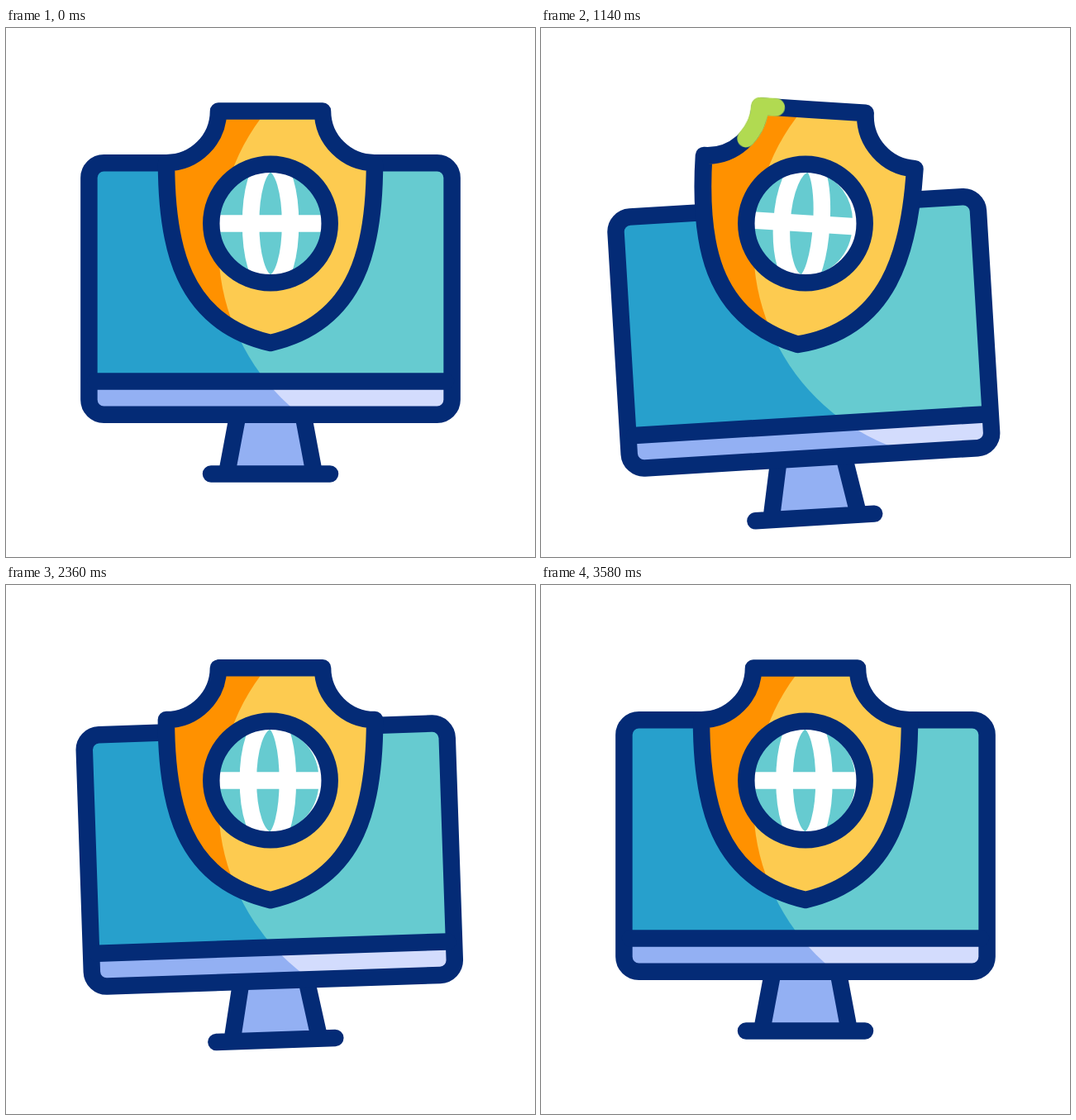
An HTML page without scripts for the animation above (3600 ms loop, 640x640 px).

```html
<!DOCTYPE html>
<html lang="en">
<head>
<meta charset="utf-8">
<title>Secure browsing</title>
<style>
  html, body { margin: 0; width: 100%; height: 100%; overflow: hidden; background: #fff; }
  svg { display: block; width: 100%; height: 100%; }

  .line { fill: none; stroke: #042b76; stroke-width: 20.5; stroke-linecap: round; stroke-linejoin: round; }
  .green { stroke: #b1da51; stroke-width: 21.3; }
  .white { stroke: #fff; stroke-linecap: butt; }

  .monitor, .shield, .globe {
    --ease: cubic-bezier(.333, 0, .667, 1);
    transform-origin: 320px 236.5px;
  }
  .monitor { transform-origin: 320px 351.5px; animation: lift 3.6s var(--ease) infinite, sway 3.6s var(--ease) infinite; }
  .shield { animation: rock 3.6s var(--ease) infinite, pulse 3.6s var(--ease) infinite; }
  .globe { animation: rock 3.6s var(--ease) infinite; }

  @keyframes lift {
    0%, 75%, 100% { translate: 0 0; }
    29.2%, 43.1% { translate: 0 52.8px; }
  }
  @keyframes sway {
    0%, 4.2%, 75.6%, 100% { rotate: 0deg; }
    25% { rotate: -6.9deg; }
    43.9% { rotate: 5.1deg; }
    59.7% { rotate: -2.8deg; }
  }
  @keyframes rock {
    0%, 62.2%, 100% { rotate: 0deg; }
    18.9% { rotate: -6.8deg; }
    33.3% { rotate: 4deg; }
    47.8% { rotate: -4.2deg; }
  }
  @keyframes pulse {
    0%, 66.7%, 100% { scale: 1; }
    17.8% { scale: 1.078; }
    35% { scale: 1.008; }
    51.1% { scale: 1.073; }
  }

  /* one lap of the highlight around the shield, then hidden */
  .lap { opacity: 0; stroke-dasharray: 0 200; animation: lap 3.6s linear .22s infinite; }
  .second { animation-delay: 1.25s; }
  @keyframes lap {
    0% { opacity: 1; stroke-dasharray: 0 200; stroke-dashoffset: 0; }
    5.25% { stroke-dasharray: 19 200; stroke-dashoffset: -8; }
    10.8% { stroke-dasharray: 24.4 200; stroke-dashoffset: -25.2; }
    14.5% { stroke-dasharray: 23.6 200; stroke-dashoffset: -44.3; }
    21.9% { stroke-dasharray: 14 200; stroke-dashoffset: -76; }
    25.6% { stroke-dasharray: 7 200; stroke-dashoffset: -88; }
    29.17% { opacity: 1; stroke-dasharray: 0 200; stroke-dashoffset: -100; }
    29.18%, 100% { opacity: 0; stroke-dasharray: 0 200; stroke-dashoffset: -100; }
  }

  .meridian { animation: spin 1.8s linear infinite; }
  .meridian:nth-of-type(2) { animation-delay: -.6s; }
  .meridian:nth-of-type(3) { animation-delay: -1.2s; }
  @keyframes spin {
    from { d: path("M0 -72C-96 -72 -96 72 0 72"); }
    to { d: path("M0 -72C96 -72 96 72 0 72"); }
  }
</style>
</head>
<body>
<svg viewBox="0 0 640 640">
  <defs>
    <path id="badge" pathLength="100" d="M320 100.500H383A63 63 0 0 0 446 163.200C446 262 428 356 320 381C212 356 194 262 194 163.200A63 63 0 0 0 257 100.500Z"/>
    <rect id="screen" x="100.400" y="163.200" width="439.200" height="264.500"/>
    <rect id="bar" x="100.400" y="427.500" width="439.200" height="40"/>
    <circle id="light" cx="516.500" cy="264" r="259.500"/>
    <circle id="disc" cx="320" cy="236.500" r="71.700"/>
    <clipPath id="in-screen"><use href="#screen" class="monitor"/></clipPath>
    <clipPath id="in-bar"><use href="#bar" class="monitor"/></clipPath>
    <clipPath id="in-badge"><use href="#badge" class="shield"/></clipPath>
    <clipPath id="in-disc"><use href="#disc"/></clipPath>
  </defs>

  <g class="monitor">
    <path d="M279 473H361L372.500 539H267.500Z" fill="#93b0f3"/>
    <path class="line" d="M279.500 473L267.500 537M360.500 473L372.500 537M248 539.500H392"/>
    <use href="#screen" fill="#27a0cc"/>
    <use href="#bar" fill="#93b0f3"/>
  </g>
  <!-- the light stays still while the shapes move through it -->
  <g clip-path="url(#in-screen)"><use href="#light" fill="#66cbd0"/></g>
  <g clip-path="url(#in-bar)"><use href="#light" fill="#d3dcfd"/></g>
  <g class="monitor line">
    <rect x="100.400" y="163.200" width="439.200" height="304.500" rx="18"/>
    <path d="M108 427.500H532"/>
  </g>

  <use href="#badge" class="shield" fill="#ff9100"/>
  <g clip-path="url(#in-badge)"><use href="#light" fill="#fdcb50"/></g>
  <g class="shield">
    <use href="#badge" class="line"/>
    <use href="#badge" class="line green lap"/>
    <use href="#badge" class="line green lap second"/>
  </g>

  <use href="#disc" fill="#66cbd0"/>
  <g clip-path="url(#in-disc)">
    <g class="globe">
      <g class="line white" transform="translate(320 236.500)">
        <path class="meridian" d="M0 -72V72"/>
        <path class="meridian" d="M0 -72V72"/>
        <path class="meridian" d="M0 -72V72"/>
        <path d="M-72 0H72"/>
      </g>
    </g>
  </g>
  <use href="#disc" class="line"/>
</svg>
</body>
</html>
```
